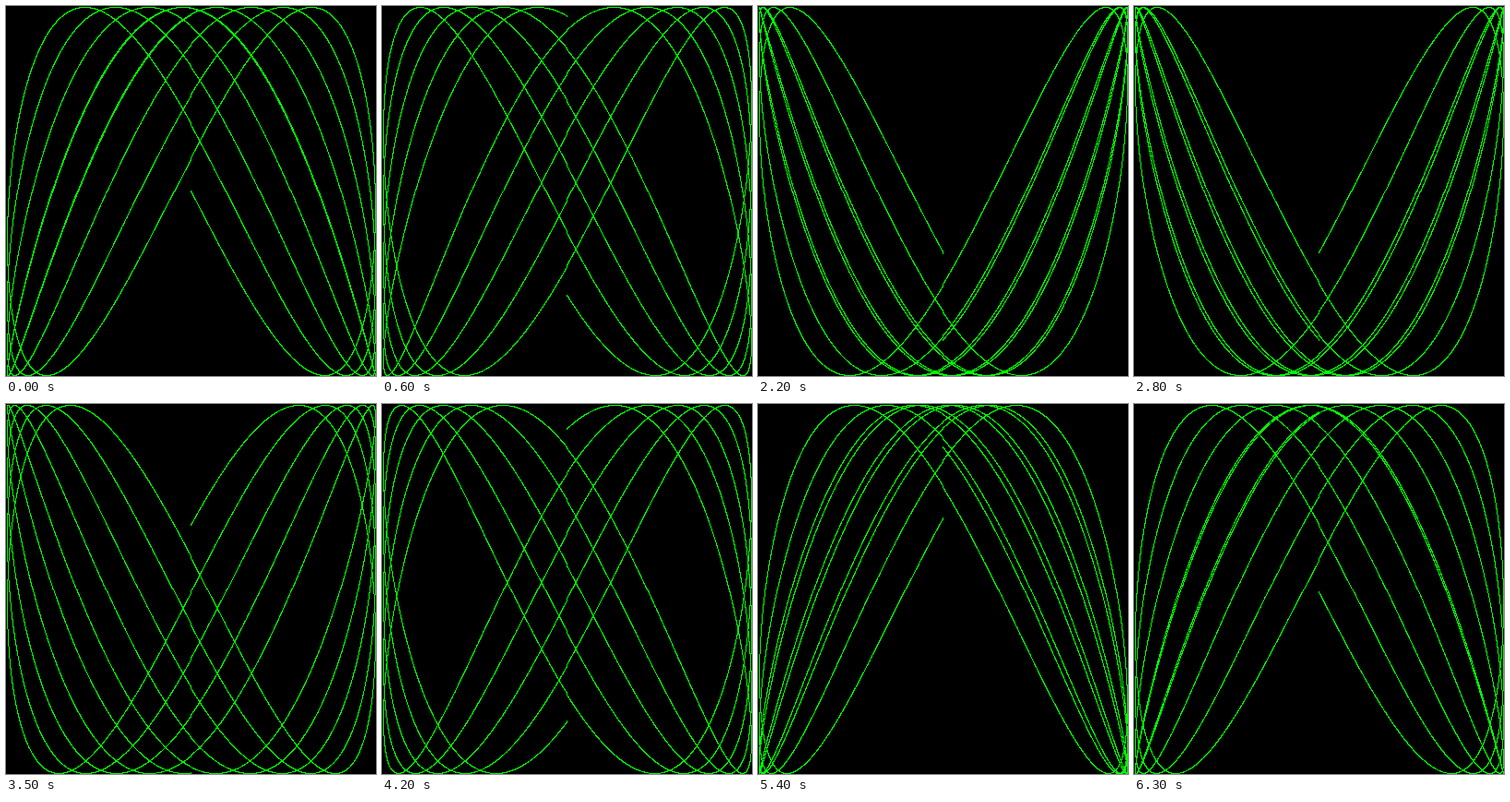
An HTML page with a canvas for the animation above (6.4 s loop, 401 by 401 pixels).

```html
<!DOCTYPE html>
<html lang="en">
<head>
<meta charset="utf-8">
<title>Lissajous figure</title>
<style>
  html, body { margin: 0; width: 100%; height: 100%; overflow: hidden; background: #000; }
  canvas { display: block; width: 401px; height: 401px; image-rendering: pixelated; }
</style>
</head>
<body>
<canvas id="stage" width="401" height="401"></canvas>
<script>
const RADIUS = 200;
const SIZE = 2 * RADIUS + 1;
const CYCLES = 5;
const RESOLUTION = 0.001;
const FREQUENCY = 1.941;
const PHASE_STEP = 0.1;
const STEP_COUNT = 64;
const STEP_MS = 100;

const ctx = document.getElementById("stage").getContext("2d");
const image = ctx.createImageData(SIZE, SIZE);
const pixels = new Uint32Array(image.data.buffer);
const BLACK = 0xff000000;
const GREEN = 0xff00ff00;

// Truncation toward zero gives the curve its small kink at the axes.
const toPixel = v => RADIUS + Math.trunc(v * RADIUS + 0.5);

function drawCurve(phase) {
  pixels.fill(BLACK);
  for (let t = 0; t < CYCLES * 2 * Math.PI; t += RESOLUTION) {
    const x = toPixel(Math.sin(t));
    const y = toPixel(Math.sin(t * FREQUENCY + phase));
    pixels[y * SIZE + x] = GREEN;
  }
  ctx.putImageData(image, 0, 0);
}

const start = performance.now();
let shown = -1;

function tick() {
  const elapsed = Math.max(0, performance.now() - start);
  const step = Math.floor(elapsed / STEP_MS) % STEP_COUNT;
  if (step !== shown) {
    drawCurve(step * PHASE_STEP);
    shown = step;
  }
  requestAnimationFrame(tick);
}
tick();
</script>
</body>
</html>
```
